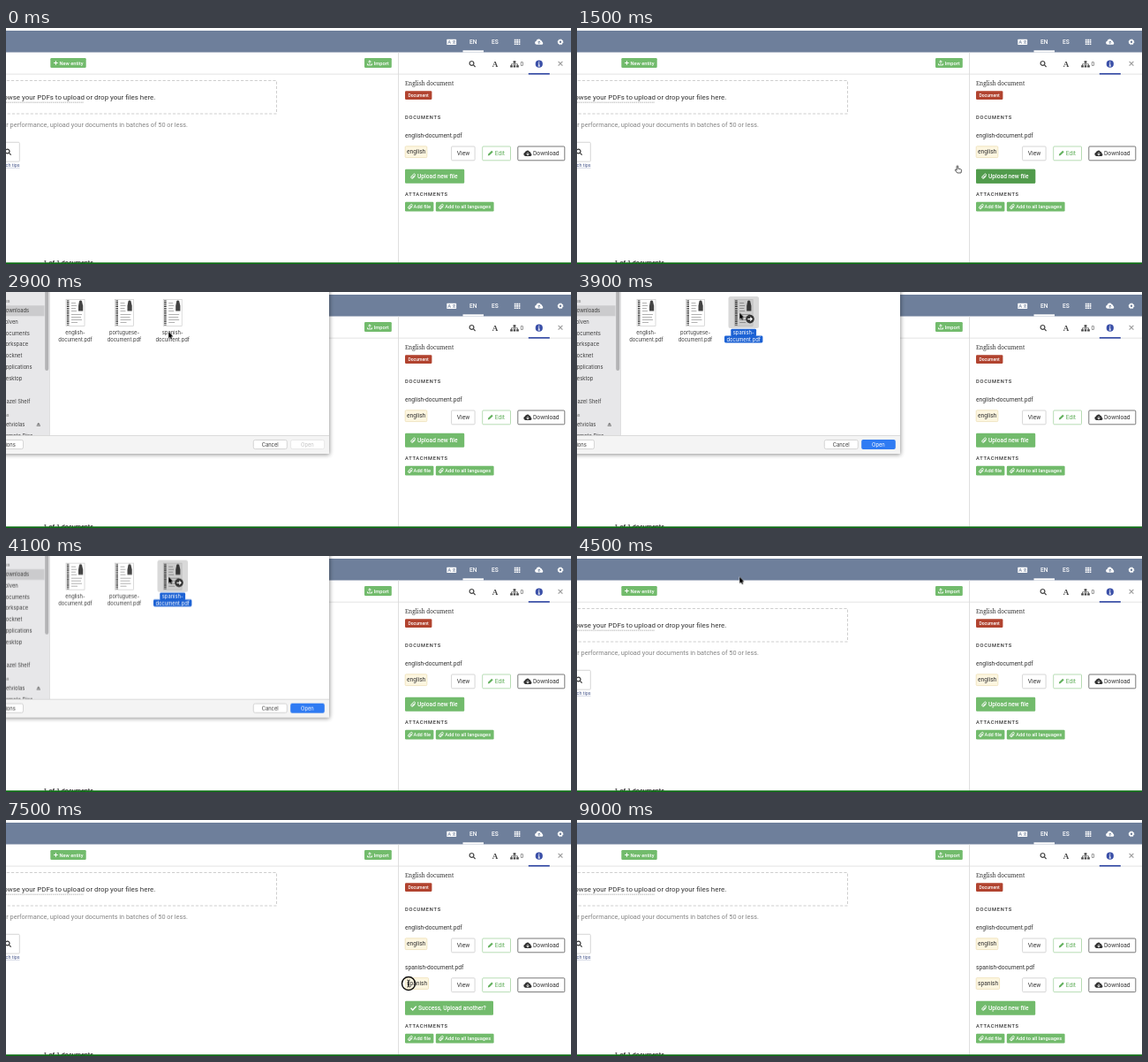
Animation of 640x267 px, one loop 9200 ms. Source, as an HTML page:

```html
<!DOCTYPE html>
<html lang="en">
<head>
<meta charset="utf-8">
<title>Adding a document</title>
<style>
html, body { margin: 0; width: 100%; height: 100%; overflow: hidden; background: #fff; }
svg { display: block; width: 100%; height: 100%; }
text { font: 6.65px Roboto, "Liberation Sans", sans-serif; fill: #333; white-space: pre; }
.small { font-size: 5.7px; }
.white { fill: #fff; }
.strong { font-weight: 500; }
.head { font-size: 5.7px; font-weight: 500; letter-spacing: .75px; }
.mac text { font: 5.8px Inter, "Liberation Sans", sans-serif; fill: #3c3c3c; }
.mac .group { font-size: 5px; font-weight: 600; fill: #8a8a8a; text-anchor: end; }
.mac .mid { text-anchor: middle; }
.mac .white { fill: #fff; }
.mac .off { fill: #c4c4c4; }
.green { fill: #72bb6c; }
.line { fill: none; stroke: currentColor; }
.box { fill: #fff; stroke: #ccc; stroke-width: .8; }
.tag { fill: #fdf6e0; stroke: #eee0b8; stroke-width: .8; }

/* One loop is 9200 ms; every part shares the same clock. */
.anim { animation: 9.2s step-end infinite; }
#hover { animation-name: hover; }
#upload { animation-name: upload; }
#processing { animation-name: processing; }
#success { animation-name: success; }
#added { animation-name: added; }
#below { animation-name: below; }
#sheet { animation-name: sheet; animation-timing-function: linear; }
#files { animation-name: files; }
#picked { animation-name: picked; }
#pointer { animation-name: pointer; animation-timing-function: ease-in-out; }
#arrow { animation-name: arrow; }
#hand { animation-name: hand; }
#beam { animation-name: beam; }
#ring { animation-name: ring; }
@keyframes hover { 0%, 29.35% { opacity: 0 } 9.78% { opacity: 1 } }
@keyframes upload { 0%, 91.3% { opacity: 1 } 51.09% { opacity: 0 } }
@keyframes processing { 0%, 72.83% { opacity: 0 } 51.09% { opacity: 1 } }
@keyframes success { 0%, 91.3% { opacity: 0 } 72.83% { opacity: 1 } }
@keyframes added { 0% { opacity: 0 } 72.83%, 100% { opacity: 1 } }
@keyframes below { 0% { transform: none } 72.83%, 100% { transform: translateY(45px) } }
@keyframes sheet {
  0%, 19.57%, 47.83%, 100% { transform: translateY(-195px) }
  22.83% { transform: translateY(-14px) }
  23.91%, 44.57% { transform: translateY(0) }
}
@keyframes files { 0% { opacity: 0 } 26.09%, 100% { opacity: 1 } }
@keyframes picked { 0% { opacity: 0 } 36.96%, 100% { opacity: 1 } }
@keyframes pointer {
  0%, 3.26% { transform: translate(470px, 280px) }
  10.87%, 14.13% { transform: translate(482px, 168px) }
  21.74%, 26.09% { transform: translate(184px, 97px) }
  34.78%, 48.91% { transform: translate(184.2px, 23.5px) }
  58.7%, 75% { transform: translate(446.3px, 156.5px) }
  80.43%, 85.87% { transform: translate(456px, 185px) }
  91.3%, 100% { transform: translate(430px, 285px) }
}
@keyframes arrow { 0%, 29.35% { opacity: 1 } 9.78%, 78.26% { opacity: 0 } }
@keyframes hand { 0%, 29.35% { opacity: 0 } 9.78% { opacity: 1 } }
@keyframes beam { 0% { opacity: 0 } 78.26%, 100% { opacity: 1 } }
@keyframes ring { 0%, 84.78% { opacity: 0 } 80.43% { opacity: 1 } }
</style>
</head>
<body>
<svg viewBox="0 0 640 267">
<defs>
  <filter id="shadow" x="-10%" y="-10%" width="120%" height="120%"><feGaussianBlur stdDeviation="2.4"/></filter>
  <path id="clip" class="line" d="M6 3.2 3.5 5.7a1.5 1.5 0 0 1-2.1-2.1L4 1a1.1 1.1 0 0 1 1.6 1.6L3.1 5a.5.5 0 0 1-.7-.7L4.5 2.2" stroke-width=".85"/>
  <path id="cloud" fill="currentColor" d="M2.3 7.2a2.1 2.1 0 0 1-.5-4.1A2.8 2.8 0 0 1 7 2.4 1.9 1.9 0 0 1 8.6 4.2 1.6 1.6 0 0 1 8.2 7.2z"/>
  <path id="down" class="line" d="M0-1.8V1M-1.4 0 0 1.4 1.4 0" stroke-width=".9"/>
  <g id="lens" class="line" stroke-width="1.2"><circle r="2.4" cx="-.7" cy="-.7"/><path d="M1.1 1.1 3.4 3.4"/></g>
  <g id="gear" class="line"><circle r="2" stroke-width="1.6"/><circle r="2.9" stroke-width="1" stroke-dasharray="1.14 1.14"/></g>
  <g id="row">
    <rect class="box" x="504.6" y="134" width="26.5" height="15.8" rx="1"/>
    <text x="510.8" y="144.3">View</text>
    <rect class="box" x="539.7" y="134" width="31.8" height="15.8" rx="1" style="stroke:#a5d3a1"/>
    <path d="M545.8 144.6l.5-2 3.9-3.9 1.5 1.5-3.9 3.9z" fill="#63b05d"/>
    <text x="553.8" y="144.3" style="fill:#63b05d">Edit</text>
    <rect class="box" x="579.8" y="134" width="53" height="15.8" rx="1" style="stroke:#555"/>
    <use href="#cloud" x="586" y="137.7" color="#333"/>
    <use href="#down" x="591" y="142.6" color="#fff"/>
    <text x="597" y="144.3">Download</text>
  </g>
  <g id="doc">
    <rect width="21" height="30" fill="#fff" stroke="#c4c4c4" stroke-width=".6"/>
    <path d="M2.2 1V29" stroke="#222" stroke-width="2.6" stroke-dasharray="1.1 1"/>
    <path d="M6 4H11M6 7H12M6 10H11M6 13H12M6 17H18M6 20H17M6 23H18M6 26H13" stroke="#aaa" stroke-width=".9"/>
    <path d="M14 13V7l1-5a1.6 1.6 0 0 1 3 0l1.2 5v6z" fill="#444"/>
  </g>
</defs>

<rect width="640" height="267" fill="#fff"/>

<!-- Top bar -->
<rect y="3" width="640" height="24.5" fill="#6e7f9b"/>
<g color="#fff">
  <rect x="499.3" y="12.8" width="10.8" height="6.2" rx=".6" fill="#fff"/>
  <path d="M500.7 17.8l1.5-3.8 1.5 3.8M501.2 16.6h2M505.8 14.8h3.2M507.4 14v.8M506 17.8q2.2-1 2.4-3M506.4 15.6q.8 1.6 2.6 2.2" class="line" color="#6e7f9b" stroke-width=".6"/>
  <text class="white strong" x="525" y="18.3">EN</text>
  <text class="white strong" x="549.9" y="18.3">ES</text>
  <rect x="517.5" y="25.3" width="23.5" height="2.2" fill="#fff"/>
  <path class="line" d="M575.8 13.6h6.6M575.8 15.9h6.6M575.8 18.2h6.6" stroke-width="1.6" stroke-dasharray="1.8 .6"/>
  <use href="#cloud" x="598.8" y="11.6"/>
  <g transform="translate(603.8 16.3) rotate(180)" color="#6e7f9b"><use href="#down"/></g>
  <use href="#gear" x="628" y="15.8"/>
</g>

<!-- Library -->
<rect y="51.7" width="640" height=".8" fill="#dcdcdc"/>
<rect class="green" x="50.3" y="34" width="40.4" height="11" rx="1.2"/>
<path d="M56.4 37.2v4.6M54.1 39.5h4.6" stroke="#fff" stroke-width="1.1"/>
<text class="small white strong" x="60.5" y="41.6">New entity</text>
<rect class="green" x="406" y="34" width="30.8" height="11" rx="1.2"/>
<path d="M409.5 40.3v1.6h5v-1.6M412 40.6v-3.6M410.4 38.4l1.6-1.6 1.6 1.6" fill="none" stroke="#fff" stroke-width=".9"/>
<text class="small white strong" x="416.7" y="41.6">Import</text>
<rect x="-20" y="59.5" width="326.5" height="37.5" fill="none" stroke="#c9c9c9" stroke-width=".9" stroke-dasharray="3.2 2"/>
<text x="169.3" y="80.8" text-anchor="end" style="font-size:7.93px">Browse your PDFs to upload or drop your files here.</text>
<path d="M0 84.2H88" stroke="#999" stroke-width=".7" stroke-dasharray="1.5 .8"/>
<text x="206" y="112.2" text-anchor="end" style="font-size:7.33px;fill:#858585">For better performance, upload your documents in batches of 50 or less.</text>
<rect class="box" x="-30" y="129.3" width="45.3" height="21.8" rx="1"/>
<use href="#lens" x="2.3" y="140.2" color="#333"/>
<text x="15.6" y="157" text-anchor="end" style="font-size:5.4px;fill:#4a5a8c">Search tips</text>
<path d="M0 158.3H15.5" stroke="#a5adc6" stroke-width=".5"/>
<text class="strong" x="42.6" y="268.2" style="font-size:7.2px">1 of 1 documents</text>

<!-- Side panel -->
<rect x="444.2" y="27.5" width=".8" height="238" fill="#d8d8d8"/>
<use href="#lens" x="528.2" y="40.6" color="#444"/>
<text x="554" y="44.4" text-anchor="middle" style="font:bold 9px 'Liberation Serif',serif;fill:#444">A</text>
<path d="M574.6 37.2h2.8v2.4h-2.8zM571.2 42.2h2.6v2.4h-2.6zM574.7 42.2h2.6v2.4h-2.6zM578.2 42.2h2.6v2.4h-2.6z" fill="#444"/>
<path d="M576 39v3.4M572.5 42.4v-1.6h7v1.6" fill="none" stroke="#444" stroke-width=".7"/>
<text x="582.6" y="43.2" style="fill:#555">0</text>
<circle cx="603.8" cy="40.7" r="4.1" fill="#3b50a8"/>
<path d="M603.8 38v1.2M602.9 40.2h.9v2.8M602.7 43h2.2" fill="none" stroke="#fff" stroke-width="1"/>
<rect x="591.8" y="51" width="24" height="1.7" fill="#3b50a8"/>
<path d="M625.6 37.8l4.8 4.8M630.4 37.8l-4.8 4.8" stroke="#999" stroke-width="1.1"/>
<text x="452" y="65.4" style="font:6.45px 'Noto Serif','Liberation Serif',serif">English document</text>
<rect x="452" y="71.2" width="30.4" height="9.8" rx="1.2" fill="#b1432f"/>
<text class="white strong" x="455.4" y="77.9" style="font-size:5.1px">Document</text>
<text class="head" x="452" y="103.2">DOCUMENTS</text>
<text x="452" y="123.8">english-document.pdf</text>
<rect class="tag" x="452.2" y="133.8" width="24.6" height="12.8" rx="1"/>
<text x="454" y="142.4">english</text>
<use href="#row"/>

<g id="added" class="anim" opacity="0">
  <text x="452" y="168.8">spanish-document.pdf</text>
  <rect class="tag" x="452.2" y="178.6" width="26.4" height="12.8" rx="1"/>
  <text x="454" y="187.2">spanish</text>
  <use href="#row" y="44.8"/>
</g>

<g id="below" class="anim">
  <g id="upload" class="anim">
    <rect class="green" x="452" y="159.8" width="67.2" height="16" rx="1.2"/>
    <rect id="hover" class="anim" x="452" y="159.8" width="67.2" height="16" rx="1.2" fill="#519b4c" opacity="0"/>
    <use href="#clip" x="457.6" y="164.3" color="#fff"/>
    <text class="white strong" x="466" y="170.2">Upload new file</text>
  </g>
  <g id="processing" class="anim" opacity="0">
    <rect class="box" x="452.4" y="160" width="54.8" height="15.5" rx="1"/>
    <use href="#gear" x="462" y="167.8" color="#333"/>
    <text class="strong" x="467" y="170.2">Processing</text>
  </g>
  <g id="success" class="anim" opacity="0">
    <rect class="green" x="452" y="159.8" width="100" height="16" rx="1.2"/>
    <path d="M458.6 167.8l2.1 2.1 4-4.2" fill="none" stroke="#fff" stroke-width="1.4"/>
    <text class="white strong" x="467" y="170.2">Success, Upload another?</text>
  </g>
  <text class="head" x="452" y="190.2">ATTACHMENTS</text>
  <rect class="green" x="452" y="196.8" width="32.4" height="10.6" rx="1.2"/>
  <use href="#clip" x="454.4" y="198.7" color="#fff"/>
  <text class="small white strong" x="461.6" y="204.2">Add file</text>
  <rect class="green" x="486.8" y="196.8" width="65.8" height="10.6" rx="1.2"/>
  <use href="#clip" x="489.4" y="198.7" color="#fff"/>
  <text class="small white strong" x="497.2" y="204.2">Add to all languages</text>
</g>

<!-- File chooser -->
<g id="sheet" class="anim mac" transform="translate(0 -195)">
  <rect x="-20" y="-60" width="386.5" height="244" fill="#000" opacity=".45" filter="url(#shadow)"/>
  <rect x="-20" y="-60" width="386" height="243" fill="#fff"/>
  <rect x="-20" y="-60" width="69.5" height="223" fill="#e7e7e9"/>
  <rect x="49" y="-60" width=".6" height="223" fill="#d2d2d2"/>
  <rect x="-5" y="15.3" width="48.5" height="12" fill="#cbcbcd"/>
  <rect x="44.2" y="-20" width="4" height="109" rx="2" fill="#b3b3b5"/>
  <text class="group" x="4.6" y="12">Favorites</text>
  <g id="places">
    <text x="-4.4" y="23.2">Downloads</text>
    <text x="-3" y="36">tolven</text>
    <text x="-4.4" y="48.8">Documents</text>
    <text x="-5.8" y="61.4">Workspace</text>
    <text x="-4" y="74.1">Pocknet</text>
    <text x="-4.2" y="86.9">Applications</text>
    <text x="-4.4" y="99.6">Desktop</text>
    <text x="-3.9" y="126">Hazel Shelf</text>
    <text x="-4.4" y="152.1">Netviolas</text>
    <text x="-4" y="164.6">Remote Disc</text>
  </g>
  <text class="group" x="3.6" y="140.6">Locations</text>
  <path d="M34.6 150.4l2.2-2.6 2.2 2.6zM34.6 151.2h4.4v.9h-4.4z" fill="#777"/>

  <g id="files" class="anim" opacity="0">
    <use href="#doc" x="68" y="8.5"/>
    <text class="mid" x="78.5" y="47.6">english-</text>
    <text class="mid" x="78.5" y="55.8">document.pdf</text>
    <use href="#doc" x="123.5" y="8.5"/>
    <text class="mid" x="134" y="47.6">portuguese-</text>
    <text class="mid" x="134" y="55.8">document.pdf</text>
    <use href="#doc" x="178.2" y="8.5"/>
    <text class="mid" x="188.7" y="47.6">spanish-</text>
    <text class="mid" x="188.7" y="55.8">document.pdf</text>
  </g>

  <rect x="-20" y="162.3" width="386" height="20.7" fill="#f4f4f4"/>
  <rect x="-20" y="162" width="386" height=".7" fill="#d0d0d0"/>
  <rect class="box" x="-20" y="167.4" width="39.5" height="10.2" rx="2"/>
  <text x="10.8" y="174.6" text-anchor="end">Options</text>
  <rect class="box" x="280.3" y="167.4" width="38" height="10.2" rx="2"/>
  <text class="mid" x="299.2" y="174.6">Cancel</text>
  <rect class="box" x="322.6" y="167.4" width="38" height="10.2" rx="2" style="stroke:#e2e2e2"/>
  <text class="mid off" x="341.4" y="174.6">Open</text>

  <g id="picked" class="anim" opacity="0">
    <rect x="171.5" y="5" width="34.6" height="36" rx="2.5" fill="#d9d9d9"/>
    <use href="#doc" x="178.2" y="8.5"/>
    <rect x="178.2" y="8.5" width="21" height="30" opacity=".2"/>
    <circle cx="196" cy="30.6" r="4.8" fill="#333"/>
    <path d="M193.4 30.6h4.8M196.2 28.6l2 2-2 2" fill="none" stroke="#fff" stroke-width="1.1"/>
    <rect x="174.3" y="41.8" width="28.8" height="8.4" rx="1.4" fill="#1d62d4"/>
    <rect x="167" y="49.4" width="43.4" height="8" rx="1.4" fill="#1d62d4"/>
    <text class="mid white" x="188.7" y="47.6">spanish-</text>
    <text class="mid white" x="188.7" y="55.8">document.pdf</text>
    <rect x="322.2" y="167" width="38.6" height="11" rx="2" fill="#2f7bf3"/>
    <text class="mid white" x="341.4" y="174.6">Open</text>
  </g>
</g>

<!-- Pointer -->
<g id="pointer" class="anim" transform="translate(470 280)" stroke-linejoin="round">
  <path id="arrow" class="anim" d="M0 0V7.4L1.7 5.9 2.9 8.5 4.1 8 2.9 5.4H5.2z" stroke="#fff" stroke-width=".7" paint-order="stroke"/>
  <path id="hand" class="anim" opacity="0" d="M-.8.7a.8.8 0 0 1 1.6 0V3.2l3 .7q1 .3.8 1.5L4 8H-.2L-2.6 5q0-1 1-.7l.8.7z" fill="#fff" stroke="#222" stroke-width=".8"/>
  <g id="beam" class="anim" opacity="0" fill="none" stroke="#222">
    <path d="M-1.8-4Q0-4 0-3V3Q0 4-1.8 4M1.8-4Q0-4 0-3V3Q0 4 1.8 4M-1 1H1" stroke-width=".9"/>
    <circle id="ring" class="anim" r="7.5" stroke="#111" stroke-width="1.5" opacity="0"/>
  </g>
</g>

<rect y="265.3" width="640" height="1.7" fill="#0b6b12"/>
</svg>
</body>
</html>
```
